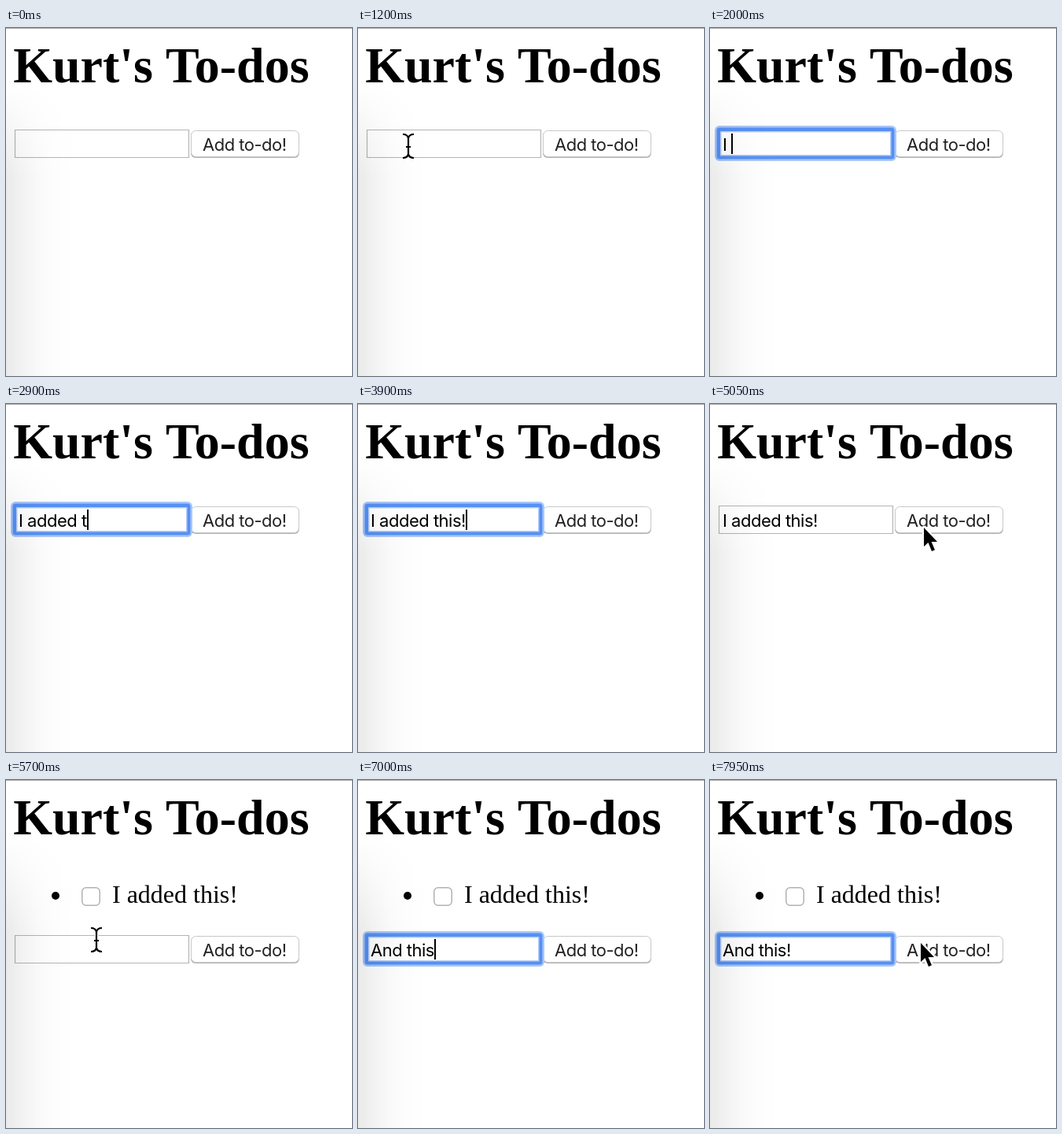
An HTML page with a canvas for the animation above (8 s loop, 440 by 442 pixels).

```html
<!DOCTYPE html>
<html lang="en">
<head>
<meta charset="utf-8">
<title>To-dos</title>
<style>
  html, body { margin: 0; width: 100%; height: 100%; overflow: hidden; background: #fff; }
  canvas { display: block; }
</style>
</head>
<body>
<canvas id="stage" width="440" height="442"></canvas>
<script>
const ctx = document.getElementById('stage').getContext('2d');
const LOOP = 8000, STEP = 50, BLINK = 500, ROW = 68;
const UI = '22px Inter, "Open Sans", sans-serif';
const SERIF = '"Liberation Serif", serif';
const ADDED = 5100;

// A burst is typed from `at` on, one character every `gap` ms
const burst = (text, at, gap = 0) => [...text].map((char, i) => ({ char, at: at + i * gap }));

const entries = [
  { focus: 1250, blur: 5050, keys: [
    ...burst('I added', 1750, 150), ...burst(' t', 2850, 50),
    ...burst('his', 3400, 100), ...burst('!', 3900)] },
  { focus: 5750, blur: LOOP, keys: [
    ...burst('A', 6100), ...burst('nd ', 6350, 75),
    ...burst('this', 6750, 80), ...burst('!', 7300)] }
];

// Pointer trips: eased along a curve that bends towards `via`
const field = [64, 150], button = [271, 156], lowField = [115, 203];
const trips = [
  { start: 700, end: 1200, hide: 1750, from: [378, 328], via: [300, 5], to: field },
  { start: 4200, end: 4750, hide: 5250, from: field, via: [168, 149], to: button },
  { start: 5250, end: 5700, hide: 6100, from: button, via: [215, 150], to: lowField },
  { start: 7600, end: 7950, hide: LOOP, from: lowField, via: [190, 215], to: [267, 206] }
];

function rounded(x, y, w, h, r, fill, stroke, line = 1) {
  ctx.beginPath();
  ctx.roundRect(x, y, w, h, r);
  if (fill) { ctx.fillStyle = fill; ctx.fill(); }
  if (stroke) { ctx.strokeStyle = stroke; ctx.lineWidth = line; ctx.stroke(); }
}

function write(text, x, y, font, spacing = 0, color = '#000') {
  ctx.font = font;
  ctx.letterSpacing = spacing + 'px';
  ctx.fillStyle = color;
  ctx.fillText(text, x, y);
}

function drawPage() {
  ctx.fillStyle = '#fff';
  ctx.fillRect(0, 0, 440, 442);
  ctx.fillStyle = '#aaa';
  ctx.fillRect(0, 0, 440, 1);
  write("Kurt's To-dos", 9.2, 68.5, 'bold 64px ' + SERIF);
}

// Soft shade along the left edge, built from strips that each fade in from above
function drawShade() {
  const width = 82, strip = 2;
  for (let x = 0; x < width; x += strip) {
    const alpha = .004 + .08 * (1 - x / width) ** 2;
    const fade = ctx.createLinearGradient(0, 70, 0, 190);
    fade.addColorStop(0, 'rgba(0,0,0,0)');
    fade.addColorStop(1, `rgba(0,0,0,${alpha})`);
    ctx.fillStyle = fade;
    ctx.fillRect(x, 70, strip, 372);
  }
}

function drawItem(text) {
  ctx.fillStyle = '#000';
  ctx.beginPath();
  ctx.arc(63, 147, 5, 0, Math.PI * 2);
  ctx.fill();
  rounded(96.75, 136.75, 22.5, 22.5, 5, '#fff', '#b2b2b2', 1.5);
  write(text, 135, 156, '32px ' + SERIF);
}

function drawButton(y) {
  rounded(235, y + 2, 138, 34, 6, '#b4b4b4');
  rounded(235.5, y + 1.5, 137, 33, 6, '#fff', '#c8c8c8');
  write('Add to-do!', 250, y + 26.5, UI, -.5, '#222');
}

function drawField(y, focused) {
  if (!focused) {
    rounded(11.5, y + .5, 221, 35, 0, '#fff', '#b4b4b4', 1.2);
    return;
  }
  rounded(6, y - 5, 231, 45, 6, '#a9c7fa');
  rounded(8.5, y - 2.5, 226, 40, 3.5, '#5690f4');
  rounded(13, y + 2, 217.5, 31.5, 0, '#b4cdf6');
  rounded(14.5, y + 3.5, 214.5, 28.5, 0, '#fff');
}

const textOf = keys => keys.map(k => k.char).join('');

function drawEntry(entry, t, y) {
  const hits = entry.keys.filter(k => k.at <= t);
  const typed = textOf(hits);
  write(typed, 16, y + 26.5, UI, -.5);
  const since = t - (hits.length ? hits[hits.length - 1].at : entry.focus);
  if (t < entry.blur && since % (2 * BLINK) < BLINK) {
    ctx.fillRect(Math.round(16 + ctx.measureText(typed).width), y + 5, 2, 26);
  }
}

function pointAt(trip, t) {
  const u = Math.min(1, (t + STEP - trip.start) / (trip.end + STEP - trip.start));
  const s = u * u * (3 - 2 * u), r = 1 - s;
  return [0, 1].map(k => r * r * trip.from[k] + 2 * r * s * trip.via[k] + s * s * trip.to[k]);
}

const beam = new Path2D('M-7-15Q-1-15 0-10Q1-15 7-15M0-10V10M-7 15Q-1 15 0 10Q1 15 7 15M-3 1H3');
const arrow = new Path2D('M1 1V25L6.5 20L11 31L15 29.2L10.5 19H18Z');

function drawPointer(x, y, overText) {
  const shape = overText ? beam : arrow;
  ctx.save();
  ctx.translate(x, y);
  ctx.lineJoin = 'round';
  ctx.strokeStyle = '#fff';
  ctx.lineWidth = 4.5;
  ctx.stroke(shape);
  if (overText) {
    ctx.strokeStyle = '#000';
    ctx.lineWidth = 2.2;
    ctx.stroke(shape);
  } else {
    ctx.fillStyle = '#000';
    ctx.fill(shape);
  }
  ctx.restore();
}

const inside = (x, y, l, t, r, b) => x >= l && x <= r && y >= t && y <= b;

function draw(t) {
  const listed = t >= ADDED;
  const y = 129 + (listed ? ROW : 0);
  const entry = entries[listed ? 1 : 0];

  drawPage();
  if (listed) drawItem(textOf(entries[0].keys));
  drawButton(y);
  drawField(y, t >= entry.focus && t < entry.blur);
  drawShade();
  if (t >= entry.focus) drawEntry(entry, t, y);

  const trip = trips.find(p => t >= p.start && t < p.hide);
  if (trip) {
    const [px, py] = pointAt(trip, t);
    const overText = inside(px, py, 11, y, 233, y + 36)
      || (listed && inside(px, py, 135, 128, 295, 164));
    drawPointer(px, py, overText);
  }
}

function tick() {
  draw(Math.floor(performance.now() % LOOP / STEP) * STEP);
  requestAnimationFrame(tick);
}
tick();
</script>
</body>
</html>
```
